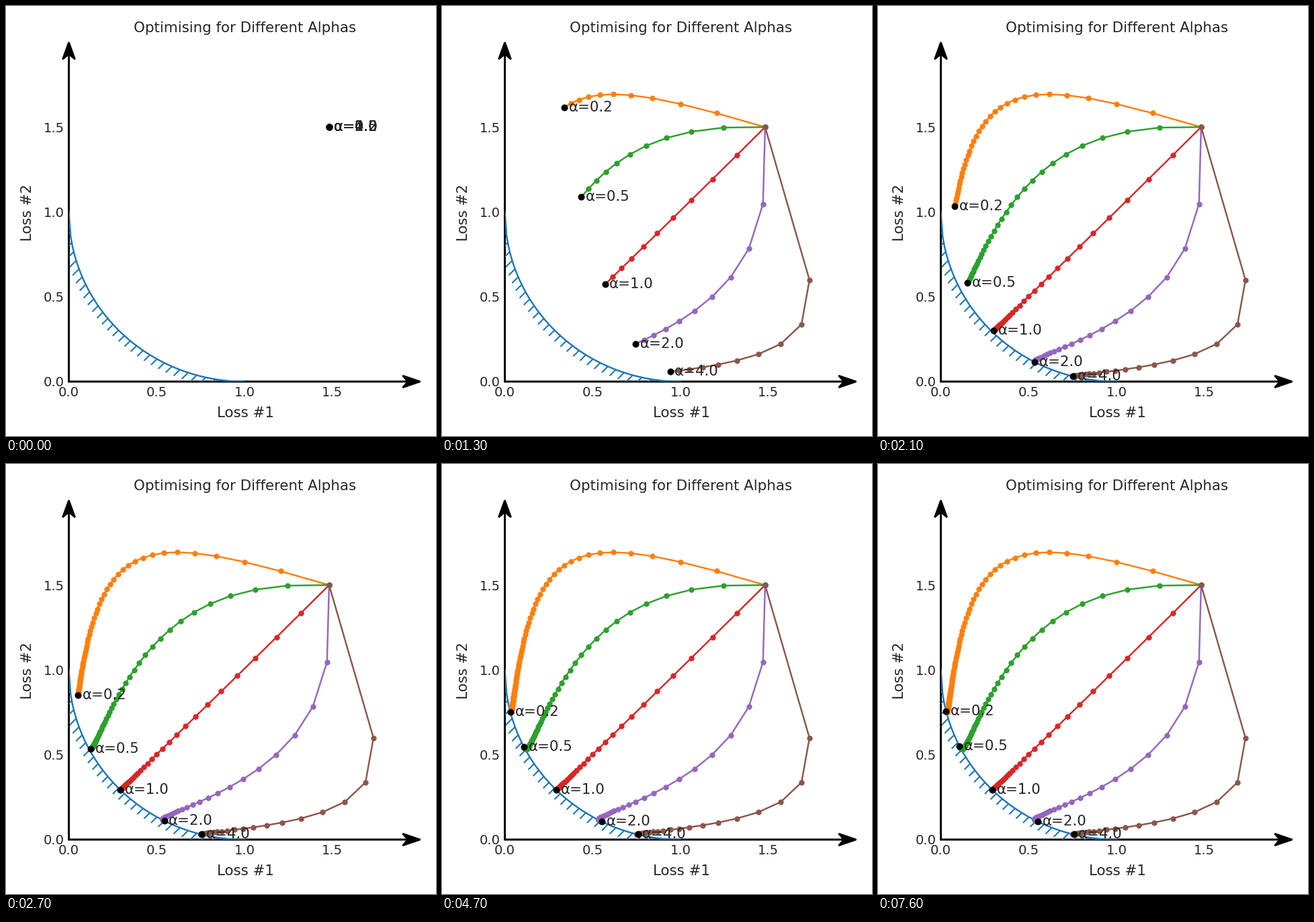
A matplotlib script for the animation above (7.7 s loop, 640 by 640 pixels).

```python
import numpy as np
import matplotlib.pyplot as plt
from matplotlib.animation import FuncAnimation

SIZE, DPI = 640, 100
FRAMES, INTERVAL = 77, 100
HOLD = 10            # frames at the start point
STRIDE = 3           # descent steps per frame
ALPHAS = [0.25, 0.5, 1.0, 2.0, 4.0]
COLORS = ["C1", "C2", "C3", "C4", "C5"]
INK = "#262626"

plt.rcParams.update({
    "font.family": "DejaVu Sans",
    "text.color": INK,
    "axes.labelcolor": INK,
    "hatch.linewidth": 1.5,
})


def losses(angle, spread):
    scale = 1 + 3 * spread ** 2
    return (1 - np.cos(angle)) * scale, (1 - np.sin(angle)) * scale


def descend(alpha, steps, rate=0.02):
    """Gradient descent on loss1 + alpha * loss2."""
    angle, spread = 0.7828, 1.1676
    track = [losses(angle, spread)]
    for _ in range(steps):
        l1, l2 = 1 - np.cos(angle), 1 - np.sin(angle)
        scale = 1 + 3 * spread ** 2
        d_angle = (np.sin(angle) - alpha * np.cos(angle)) * scale
        d_spread = 6 * spread * (l1 + alpha * l2)
        angle -= rate * d_angle
        spread -= rate * d_spread
        track.append(losses(angle, spread))
    return np.array(track)


def step_at(frame):
    return max(0, STRIDE * (frame - HOLD) + 1)


def arc(radius):
    t = np.linspace(0, np.pi / 2, 120)
    return 1 - radius * np.cos(t), 1 - radius * np.sin(t)


fig = plt.figure(figsize=(SIZE / DPI, SIZE / DPI), dpi=DPI, facecolor="white")
left, right, top, bottom = 93.5, 616.5, 54, 559
ax = fig.add_axes([left / SIZE, 1 - bottom / SIZE,
                   (right - left) / SIZE, (bottom - top) / SIZE])
ax.set(xlim=(0, 2), ylim=(0, 2))
ax.set_xticks([0, 0.5, 1, 1.5])
ax.set_yticks([0, 0.5, 1, 1.5])
ax.tick_params(length=0, pad=4.8, labelsize=14.1, labelcolor=INK)
for side in ax.spines.values():
    side.set_visible(False)


def label(x, y, text, **kw):
    fig.text(x / SIZE, 1 - y / SIZE, text, fontsize=15.4, **kw)


label(355.5, 39.4, "Optimising for Different Alphas", ha="center")
label(356, 612.5, "Loss #1", ha="center")
label(42.5, 307, "Loss #2", ha="right", va="center", rotation=90)

head = dict(fc="k", ec="k", lw=1.8, width=0.0005, head_width=0.07,
            head_length=0.1, overhang=0.3, length_includes_head=True,
            clip_on=False)
ax.arrow(0, 0, 2, 0, **head)
ax.arrow(0, 0, 0, 2, **head)

# Front with hatching on its infeasible side
fx, fy = arc(1)
bx, by = arc(1.047)
ax.fill(np.r_[fx, bx[::-1]], np.r_[fy, by[::-1]], fc="none", ec="C0",
        lw=0, hatch="//")
x = np.linspace(0, 1, 100)
ax.plot(x, 1 - np.sqrt(1 - (1 - x) ** 2), color="C0", lw=1.75)

tracks = [descend(a, step_at(FRAMES - 1)) for a in ALPHAS]
trails = [ax.plot([], [], "-o", color=c, lw=1.75, ms=5)[0] for c in COLORS]
dots = [ax.plot([], [], "o", color="k", ms=6.2)[0] for _ in ALPHAS]
tags = [ax.text(0, 0, f"α={a:.1f}", fontsize=15.4, va="center")
        for a in ALPHAS]


def draw(frame):
    step = step_at(frame)
    for track, trail, dot, tag in zip(tracks, trails, dots, tags):
        x, y = track[step]
        trail.set_data(*track[:step + 1].T)
        dot.set_data([x], [y])
        tag.set_position((x + 0.025, y))
    return trails + dots + tags


anim = FuncAnimation(fig, draw, frames=FRAMES, interval=INTERVAL,
                     repeat=True, repeat_delay=0)
plt.show()
```
